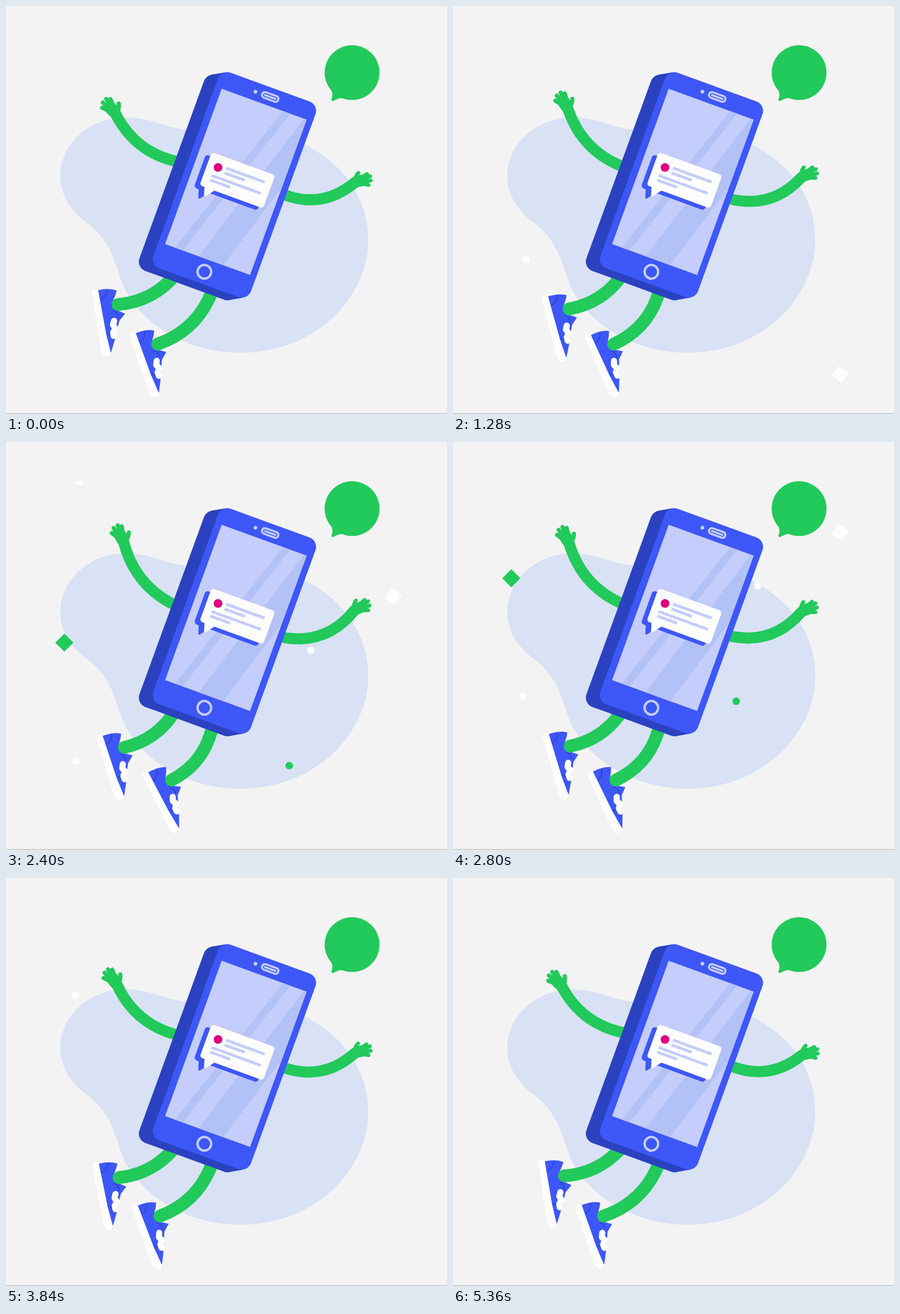
Recreate the animation shown at these times as an HTML page. Size 756 by 700 pixels, loop 5.44 s.

```html
<!DOCTYPE html>
<html lang="en">
<head>
<meta charset="utf-8">
<title>Jumping phone</title>
<style>
  html, body { margin: 0; width: 100%; height: 100%; overflow: hidden; background: #f3f3f3; }
  svg { display: block; width: 756px; height: 700px; }
  .green { fill: #21ca5a; }
  .blue { fill: #3d57f8; }
  .navy { fill: #2b42c0; }
  .pale { fill: #c4cdfb; }
  .white { fill: #fdfdfd; }
  .limb, .fingers { fill: none; stroke: #21ca5a; stroke-linecap: round; }
  .fingers { stroke-width: 7; }
  .lines { fill: none; stroke: #c4cdfb; stroke-width: 5; }
  .seam { fill: none; stroke: #2b42c0; stroke-width: 1.5; }
</style>
</head>
<body>
<svg viewBox="0 0 756 700">
  <defs>
    <clipPath id="band"><rect y="67" width="756" height="603"/></clipPath>
    <g id="hand">
      <path class="green" d="M-9 3 Q-12 -8 -13 -18 L8 -19 Q11 -9 9 3 Z"/>
      <path class="fingers" d="M-8 -13L-14 -22M-5 -13L-8 -29M0 -13L0 -31M4 -14L6 -27M4 -1Q11 -6 14 -13"/>
    </g>
    <g id="shoe">
      <path class="blue" d="M-34 -25 Q-15 -29 -2 -24 Q-3 -18 -8 -8 L-3 9 L12 16 L2 28 L-5 56 Q-9 70 -13 82 L-20 76 Z"/>
      <path class="seam" d="M-31 -9 Q-20 -12 -18 -25 M-8 10 Q-1 13 0 23 M-21 48 Q-17 48 -14 52"/>
      <path class="white" d="M-45 -23 Q-45 -28 -34 -27 L-21 50 L-14 80 Q-12 88 -20 89 Q-26 89 -30 79 Z"/>
      <path d="M-7 28 L-9 35 L-5 41 L-9 48 L-8 54" fill="none" stroke="#fdfdfd" stroke-width="10.5" stroke-linecap="round" stroke-linejoin="round"/>
    </g>
    <path id="card" d="M423 115 H527 Q533 115 533 121 V169.500 Q533 175.500 527 175.500 H444 L433 190 Q430 191 429.500 187 L426 175.500 H423 Q417 175.500 417 169.500 V121 Q417 115 423 115 Z"/>
  </defs>

  <path fill="#d9e1f5" d="M205 191 C250 191 270 209 310 212 C400 215 470 215 513 238 C585 275 621 335 621 402 C621 500 530 595 402 595 C300 595 220 535 197 470 C186 438 178 402 140 373 C112 353 93 325 93 292 C93 235 145 191 205 191 Z"/>

  <g clip-path="url(#band)">
    <g id="confetti">
      <circle class="white" cx="126" cy="431" r="6.3"/>
      <rect class="white" x="653.5" y="617.5" width="21" height="21" transform="rotate(35 664 628)"/>
      <rect class="green" x="89" y="696" width="22" height="22" transform="rotate(45 100 707)"/>
      <circle class="white" cx="522.5" cy="720" r="6.3"/>
      <circle class="green" cx="323" cy="381" r="6.5"/>
      <circle class="white" cx="119.500" cy="910" r="6.3"/>
      <circle class="green" cx="485.5" cy="918" r="6.5"/>
    </g>
  </g>

  <g id="body"></g>

  <g transform="rotate(20)">
    <rect class="navy" x="363" y="-12" width="178" height="357.500" rx="17"/>
    <path class="navy" d="M392.5 -21.8 L371.5 -9.8 L532.5 343 L553.5 331 Z"/>
    <rect class="blue" x="384" y="-24" width="178" height="357" rx="17"/>
    <rect class="pale" x="396" y="7" width="155" height="283.500"/>
    <path fill="#b3c2f6" d="M508 7 H521 L428 290.500 H414 Z M546 7 H551 V131 L502 290.500 H457 Z"/>
    <circle class="pale" cx="452" cy="-8" r="3.2"/>
    <rect class="pale" x="462.500" y="-15" width="33" height="13.500" rx="6.7"/>
    <rect x="467" y="-10.800" width="24" height="5" rx="2.5" fill="#c4cdfb" stroke="#3d57f8" stroke-width="1.5"/>
    <circle cx="475.5" cy="312.2" r="11.7" fill="none" stroke="#c4cdfb" stroke-width="4"/>
    <use href="#card" class="blue" x="-8" y="7"/>
    <use href="#card" class="white"/>
    <circle cx="436.3" cy="136" r="7.5" fill="#e0007f"/>
    <path class="lines" d="M449.500 132.300 H520 M450 141 H487 M430.500 152.700 H520.5 M431 160.800 H467"/>
  </g>

  <g class="green">
    <circle cx="593.3" cy="114.300" r="47"/>
    <path d="M556 140 Q562 152 558 160 Q558 165 563 162 Q569 158 580 157 Z"/>
  </g>
  <rect y="698.500" width="756" height="1.5" fill="#c9c9c9"/>
</svg>
<script>
const LOOP = 5440, STEP = 80, PEAK = 2165;

// As the body swings up, the root sinks and the tip moves by lift.
// Bend is the sideways bow of the limb; twist sets the tip against its end direction.
const limbs = [
  { tip: 'shoe', width: 22, root: [284, 468], end: [191, 511], sink: 2, lift: [12, 13], bend: .19, twist: 94, scale: '1' },
  { tip: 'shoe', width: 22, root: [353, 490], end: [258, 580], sink: 2, lift: [26, 0], bend: .23, twist: 99, scale: '1' },
  { tip: 'hand', width: 19, root: [296, 266], end: [187, 187], sink: 17, lift: [15, -15], bend: .24, twist: -5, scale: '1' },
  { tip: 'hand', width: 19, root: [478, 323], end: [598, 304], sink: 13, lift: [-1, -15], bend: -.29, twist: 18, scale: '-.92 .92' }
];

const swing = t => 1.02 * Math.exp(-(((t - PEAK) / 1370) ** 2));

// Confetti rises and slows down.
function rise(t) {
  const s = t - 1280;
  return .3653 * s - 3.38e-5 * s * s - 4;
}

function add(parent, name, attrs) {
  const node = document.createElementNS('http://www.w3.org/2000/svg', name);
  for (const key in attrs) node.setAttribute(key, attrs[key]);
  return parent.appendChild(node);
}

const body = document.getElementById('body');
const confetti = document.getElementById('confetti');
for (const limb of limbs) {
  limb.tipNode = add(body, 'use', { href: '#' + limb.tip });
  limb.path = add(body, 'path', { class: 'limb', 'stroke-width': limb.width });
}

function pose({ root, end, sink, lift, bend, twist, scale, path, tipNode }, p) {
  const x0 = root[0], y0 = root[1] + sink * p;
  const x1 = end[0] + lift[0] * p, y1 = end[1] + lift[1] * p;
  const cx = (x0 + x1) / 2 + bend * (y1 - y0);
  const cy = (y0 + y1) / 2 - bend * (x1 - x0);
  const angle = Math.atan2(x1 - cx, cy - y1) * 180 / Math.PI + twist;
  path.setAttribute('d', `M${x0} ${y0}Q${cx} ${cy} ${x1} ${y1}`);
  tipNode.setAttribute('transform', `translate(${x1} ${y1}) rotate(${angle}) scale(${scale})`);
}

function draw() {
  const t = Math.floor(performance.now() % LOOP / STEP) * STEP;
  const p = swing(t);
  for (const limb of limbs) pose(limb, p);
  confetti.setAttribute('transform', `translate(0 ${-rise(t)})`);
  requestAnimationFrame(draw);
}
draw();
</script>
</body>
</html>
```
